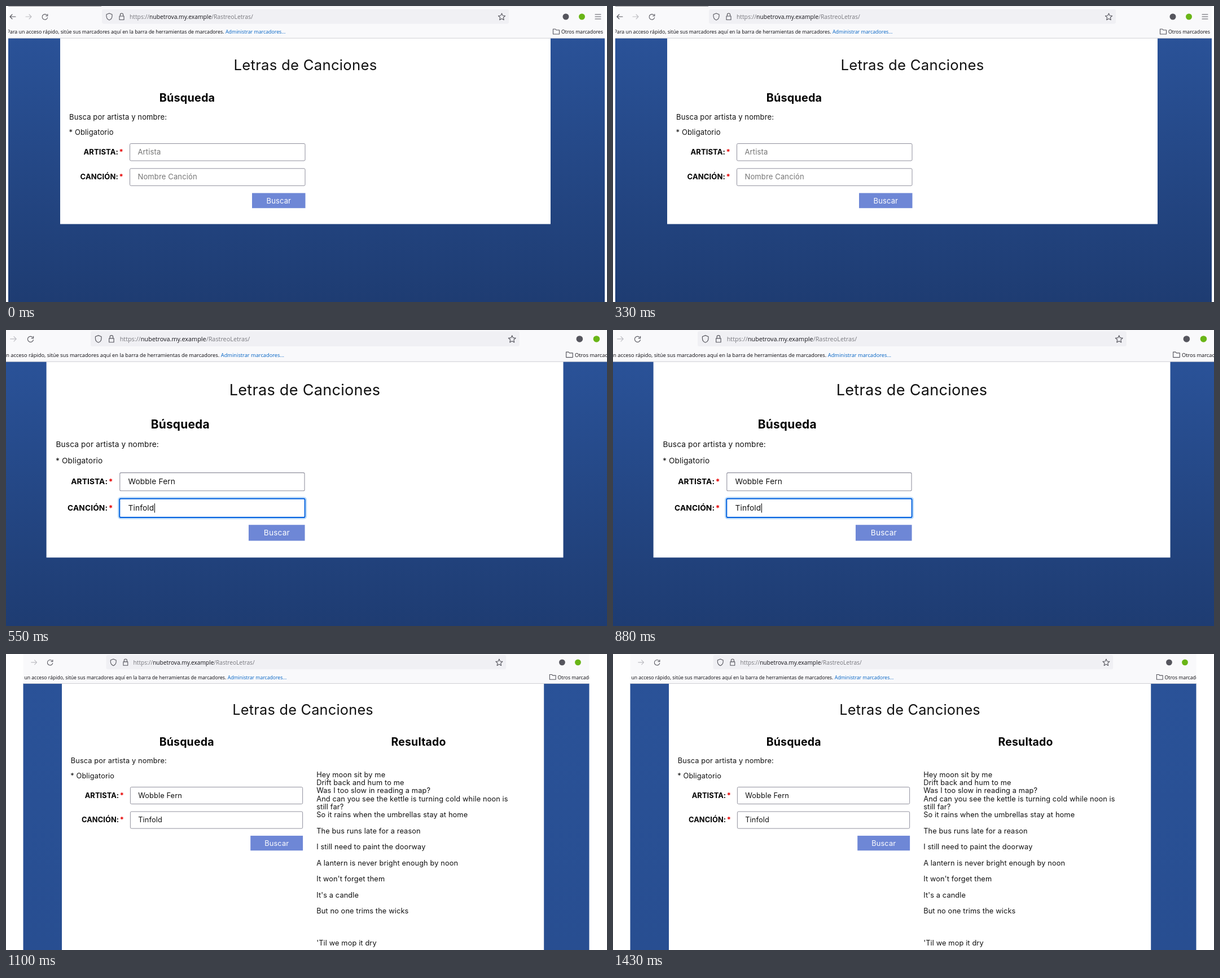
An HTML page with a canvas for the animation above (1.65 s loop, 1065 px wide and 526 px high).

```html
<!DOCTYPE html>
<html lang="es">
<head>
<meta charset="utf-8">
<title>Letras de Canciones</title>
<style>
  html, body { margin: 0; width: 100%; height: 100%; overflow: hidden; background: #fff; }
  canvas { display: block; }
</style>
</head>
<body>
<canvas id="stage" width="1065" height="526"></canvas>
<script>
const ctx = document.getElementById('stage').getContext('2d');
const WIDTH = 1065, HEIGHT = 526, HOLD = 550;
const PAGE_FONT = 'Inter, sans-serif', CHROME_FONT = '"Open Sans", sans-serif';
const INK = '#111', ICON = '#55555d';

// Each scene is one zoom of the browser window; (x, y) is the top left corner of the white panel.
const scenes = [
  { x: 96, y: 57, zoom: 1, chromeX: 96, left: 4, right: 1061, fade: 469, artist: '', song: '' },
  { x: 71.6, y: 56, zoom: 1.054, chromeX: 72, left: 0, right: 1065, fade: 446, artist: 'Wobble Fern', song: 'Tinfold', focus: true },
  { x: 99, y: 52.2, zoom: .983, chromeX: 104.7, left: 30.5, right: 1033.5, fade: 2600, artist: 'Wobble Fern', song: 'Tinfold', result: true },
];

// [line slot, text]
const lyrics = [
  [0, 'Hey moon sit by me'],
  [1, 'Drift back and hum to me'],
  [2, 'Was I too slow in reading a map?'],
  [3, 'And can you see the kettle is turning cold while noon is'],
  [4, 'still far?'],
  [5, 'So it rains when the umbrellas stay at home'],
  [7, 'The bus runs late for a reason'],
  [9, 'I still need to paint the doorway'],
  [11, 'A lantern is never bright enough by noon'],
  [13, "It won't forget them"],
  [15, "It's a candle"],
  [17, 'But no one trims the wicks'],
  [21, "'Til we mop it dry"],
];

function text(str, x, y, { size = 13, weight = 400, color = INK, align = 'left', font = PAGE_FONT } = {}) {
  ctx.font = `${weight} ${size}px ${font}`;
  ctx.letterSpacing = font === PAGE_FONT ? size * .01 + 'px' : '0px';
  ctx.textAlign = align;
  ctx.fillStyle = color;
  ctx.fillText(str, x, y);
  return ctx.measureText(str).width;
}

function rect(x, y, w, h, color) {
  ctx.fillStyle = color;
  ctx.fillRect(x, y, w, h);
}

function roundBox(x, y, w, h, radius, color, line) {
  ctx.beginPath();
  ctx.roundRect(x, y, w, h, radius);
  if (line) {
    ctx.strokeStyle = color;
    ctx.lineWidth = line;
    ctx.stroke();
  } else {
    ctx.fillStyle = color;
    ctx.fill();
  }
}

function stroke(path, x, y, color = ICON) {
  ctx.save();
  ctx.translate(x, y);
  ctx.strokeStyle = color;
  ctx.lineWidth = 1.1;
  ctx.lineCap = ctx.lineJoin = 'round';
  ctx.stroke(new Path2D(path));
  ctx.restore();
}

function dot(x, y, radius, color) {
  ctx.beginPath();
  ctx.arc(x, y, radius, 0, Math.PI * 2);
  ctx.fillStyle = color;
  ctx.fill();
}

function starPath(outer, inner) {
  const points = Array.from({ length: 10 }, (_, i) => {
    const angle = i * Math.PI / 5 - Math.PI / 2, r = i % 2 ? inner : outer;
    return `${r * Math.cos(angle)} ${r * Math.sin(angle)}`;
  });
  return `M${points.join('L')}Z`;
}

function drawChrome() {
  rect(-200, -60, 1300, 60, '#f9f9fb');
  rect(-200, -57, 1300, 1.4, '#f0f0f4');
  rect(-92, -57, 165, 1, '#98989c');
  rect(-200, -.3, 1300, 1, '#cfcfd4');
  roundBox(74, -51, 721, 25.5, 3, '#f0f0f4');

  stroke('M5 0H-5M-1-4L-5 0L-1 4', -84, -38);
  stroke('M-5 0H5M1-4L5 0L1 4', -56, -38, '#bdbdc2');
  stroke('M4.6 1A4.8 4.8 0 1 1 3.4-3.4M4.8-5V-1.8H1.6', -27, -37.5);
  stroke('M0-6L5-4V-1Q5 4 0 6Q-5 4-5-1V-4Z', 87, -38);
  stroke('M-4-1H4V5.5H-4ZM-2.6-1V-3.4A2.6 2.6 0 0 1 2.6-3.4V-1', 109, -38);
  stroke(starPath(6.4, 3), 782.5, -37.5);
  dot(896, -38, 5.5, ICON);
  dot(924.5, -38, 5.5, '#69b517');
  stroke('M-5-4H5M-5 0H5M-5 4H5', 953, -38);
  stroke('M-5.5 4.5V-4.5H-1.5L0-2.8H5.5V4.5Z', 879, -11.5);

  const url = { size: 10.3, font: CHROME_FONT, color: '#77777d' };
  let x = 123;
  x += text('https://', x, -34, url);
  x += text('nubetrova.my.example', x, -34, { ...url, color: '#15141a' });
  text('/RastreoLetras/', x, -34, url);

  const bar = { size: 8.8, font: CHROME_FONT, color: '#08070c' };
  text('Para un acceso rápido, sitúe sus marcadores aquí en la barra de herramientas de marcadores.',
    290.5, -7.7, { ...bar, align: 'right' });
  text('Administrar marcadores...', 293, -7.7, { ...bar, color: '#0062c4' });
  text('Otros marcadores', 888, -7.7, bar);
}

function drawField(label, value, placeholder, y, focused) {
  const baseline = y + 20;
  text(label, 103, baseline, { weight: 700, align: 'right', color: '#000' });
  text('*', 104.5, baseline, { weight: 700, color: '#e60000' });
  if (focused) {
    roundBox(121, y - 2, 315.8, 35.5, 4, '#bddcf9', 2.2);
    roundBox(123, y, 311.6, 31.5, 2, '#0060df', 1.9);
  } else {
    roundBox(123.5, y + .5, 310.5, 30.5, 2, '#8f8f9d', 1);
  }
  const width = text(value || placeholder, 137.5, baseline, { color: value ? INK : '#757575' });
  if (focused) rect(138 + width, y + 8, 1, 15.5, '#000');
}

function drawPage(scene) {
  const sky = ctx.createLinearGradient(0, 0, 0, scene.fade);
  sky.addColorStop(0, '#2a5298');
  sky.addColorStop(1, '#1e3c72');
  rect(-200, 0, 1400, 600, sky);
  rect(0, 0, 869, scene.result ? 600 : 330.5, '#fff');

  const heading = { size: 19.8, weight: 700, align: 'center', color: '#000' };
  text('Letras de Canciones', 434.5, 56.5, { size: 25.7, align: 'center' });
  text('Búsqueda', 225, 113, heading);
  text('Busca por artista y nombre:', 16, 144.5);
  text('* Obligatorio', 15.5, 171.5);
  drawField('ARTISTA:', scene.artist, 'Artista', 187, false);
  drawField('CANCIÓN:', scene.song, 'Nombre Canción', 231.3, scene.focus);
  rect(340, 275.4, 94.5, 26.8, '#6e87d6');
  text('Buscar', 387.3, 293.6, { align: 'center', color: '#fff' });

  if (scene.result) {
    text('Resultado', 643, 113, heading);
    for (const [slot, line] of lyrics) text(line, 459, 169.5 + slot * 14.5);
  }
}

function drawAt(originX, scene, draw) {
  ctx.save();
  ctx.translate(originX, scene.y);
  ctx.scale(scene.zoom, scene.zoom);
  draw(scene);
  ctx.restore();
}

function render() {
  const scene = scenes[Math.floor(performance.now() / HOLD) % scenes.length];
  rect(0, 0, WIDTH, HEIGHT, '#fff');
  ctx.save();
  ctx.beginPath();
  ctx.rect(scene.left, 0, scene.right - scene.left, HEIGHT);
  ctx.clip();
  drawAt(scene.x, scene, drawPage);
  drawAt(scene.chromeX, scene, drawChrome);
  ctx.restore();
  requestAnimationFrame(render);
}
render();
</script>
</body>
</html>
```
